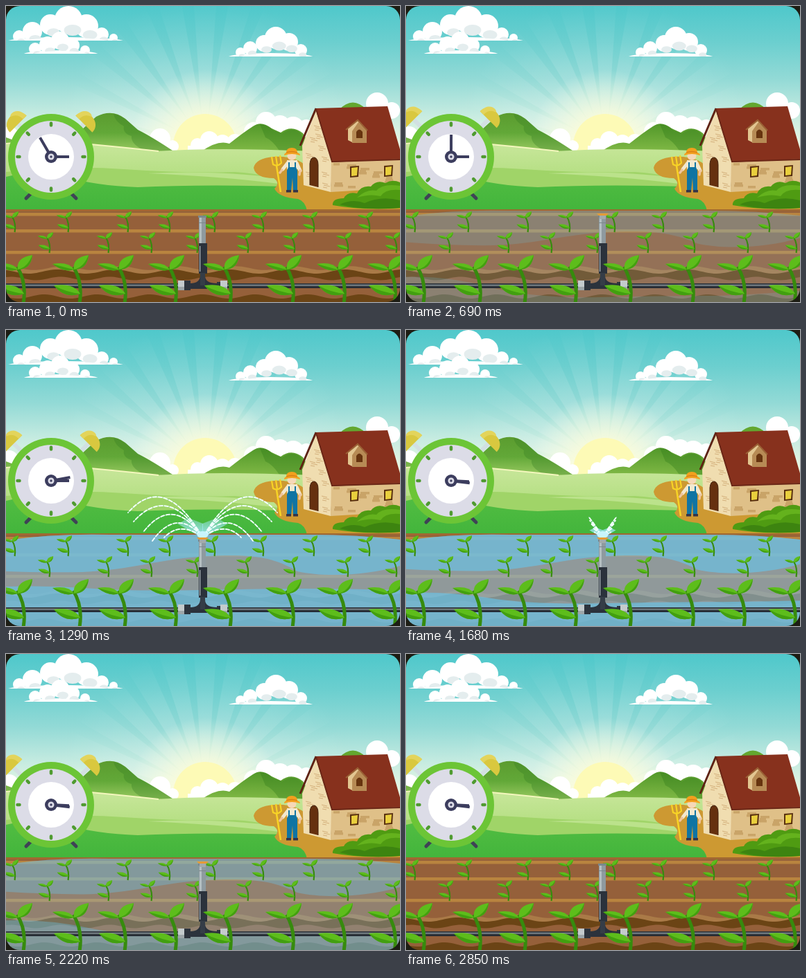
These frames come from a looping animation (568 by 428 pixels, 2880 ms). An HTML page with a canvas:

```html
<!DOCTYPE html>
<html lang="en">
<head>
<meta charset="utf-8">
<title>Timed irrigation</title>
<style>
html, body { margin: 0; width: 100%; height: 100%; overflow: hidden; background: #1d1d14; }
canvas { display: block; width: 568px; height: 428px; border-radius: 20px; }
</style>
</head>
<body>
<canvas id="stage" width="568" height="428"></canvas>
<script>
const W = 568, H = 428, LOOP = 2880, TAU = Math.PI * 2;
const stage = document.getElementById('stage').getContext('2d');
let c = stage;

function layer(draw) {
  const el = document.createElement('canvas');
  el.width = W; el.height = H;
  c = el.getContext('2d');
  draw();
  c = stage;
  return el;
}
function fill(color, d) { c.fillStyle = color; c.fill(new Path2D(d)); }
function line(color, width, d, cap = 'butt') {
  c.strokeStyle = color; c.lineWidth = width; c.lineCap = cap;
  c.stroke(new Path2D(d));
}
function box(color, x, y, w, h) { c.fillStyle = color; c.fillRect(x, y, w, h); }
function disc(color, x, y, rx, ry = rx) {
  c.fillStyle = color; c.beginPath(); c.ellipse(x, y, rx, ry, 0, 0, TAU); c.fill();
}
function fade(x0, y0, x1, y1, ...stops) {
  const g = c.createLinearGradient(x0, y0, x1, y1);
  stops.forEach((s, i) => g.addColorStop(i / (stops.length - 1), s));
  return g;
}
// Round puffs cut off along a flat base.
function cloud(base, left, right, puffs) {
  c.save();
  c.beginPath(); c.rect(0, 0, W, base); c.clip();
  disc('#fff', (left + right) / 2, base + 1, (right - left) / 2, 6);
  for (const [x, y, r] of puffs) disc('#fff', x, y, r);
  for (const [x, y, r] of puffs) disc('#e4edee', x + r * .3, y + r * .75, r * .62, r * .4);
  disc('#fff', (left + right) / 2, base + 2, (right - left) * .38, 6);
  c.restore();
}

function drawSky() {
  box(fade(0, 0, 0, 212, '#4fc8cb', '#6ccfcf', '#93dad6', '#c8ece1', '#f3fae3'), 0, 0, W, 212);
  c.save();
  c.translate(287, 200);
  for (let i = 0; i < 13; i++) {
    c.save();
    c.rotate((-84 + i * 14) * Math.PI / 180);
    fill(fade(0, -50, 0, -215, 'rgba(255,255,255,.22)', 'rgba(255,255,255,0)'), 'M-5-40L-17-215H17L5-40Z');
    c.restore();
  }
  c.restore();
  const glow = c.createRadialGradient(287, 202, 40, 287, 202, 110);
  glow.addColorStop(0, 'rgba(255,253,215,.8)');
  glow.addColorStop(1, 'rgba(255,255,235,0)');
  disc(glow, 287, 202, 110);
  disc('#fdfab6', 287, 202, 46);

  cloud(50, 2, 170, [[90, 20, 20], [64, 27, 15], [116, 29, 17], [38, 37, 14], [138, 41, 10], [19, 44, 9], [155, 46, 6]]);
  cloud(69, 25, 133, [[78, 50, 13], [60, 56, 12], [95, 57, 11], [42, 62, 9], [114, 64, 7]]);
  cloud(73, 320, 443, [[389, 46, 16], [372, 54, 12], [408, 52, 13], [352, 61, 10], [425, 64, 9], [338, 67, 7]]);
  for (const [x, y, r] of [[222, 192, 15], [205, 200, 10], [240, 203, 9], [293, 194, 13], [276, 201, 10], [312, 198, 12],
    [330, 196, 11], [375, 168, 15], [357, 182, 14], [395, 172, 14], [414, 176, 16], [433, 176, 12], [535, 141, 16], [556, 151, 12], [5, 186, 12]]) disc('#fff', x, y, r);
  box('#fff', 262, 202, 70, 10);
}

function drawHills() {
  const hill = fade(0, 155, 0, 212, '#5b9c2f', '#62a838', '#9ccb63');
  fill(hill, 'M80 206Q112 176 130 160Q153 148 172 163L190 179Q210 189 243 211Z');
  fill('rgba(48,120,30,.3)', 'M155 156Q166 158 174 165L190 179Q212 190 243 211L196 207Q180 199 181 188Q168 184 170 174Q157 167 155 156Z');
  fill(hill, 'M0 190Q18 195 32 212H0Z');
  fill(fade(0, 168, 0, 210, '#4f9628', '#7fb845'), 'M282 210Q306 193 322 199Q342 183 356 174Q368 165 383 177L396 183Q412 171 428 184L445 212Z');
  fill('rgba(48,120,25,.35)', 'M366 171Q376 171 386 180L398 184Q413 174 425 184L436 209H394Q384 194 374 190Z');
  fill('#63a72f', 'M480 150Q500 129 520 150Z');

  fill(fade(0, 196, 0, 262, '#c9e79c', '#aedc7a'), 'M0 200Q70 193 122 200Q175 205 220 210Q300 204 440 210V270H0Z');
  line('#f4f7bd', 1.8, 'M0 199Q70 193 122 200Q175 205 220 210');
  fill('#a0d468', 'M0 240Q90 230 170 236Q260 242 330 240Q380 243 430 262V280H0Z');
  fill('#bbe28b', 'M205 242Q310 236 430 253V262Q330 247 205 242Z');
  fill(fade(0, 240, 0, 295, '#52bd42', '#43b53c'), 'M0 247Q45 236 86 247Q130 260 190 262Q290 257 440 262V297H0Z');
  fill('#cd9932', 'M357 234Q360 220 386 218Q425 216 440 240L470 262L568 258V296H434Q431 282 421 279Q393 277 387 264Q396 256 386 249Q360 249 357 234Z');
}

function drawHouse() {
  fill('#f0ddb0', 'M447 151L427 202L429 259L468 269L471 225Z');
  fill('#dfc088', 'M469 223L568 220V263L468 269Z');
  for (let i = 0; i < 15; i++) {
    const x = 472 + (i * 37) % 92, y = 227 + (i * 13) % 34;
    box('#c9a468', x, y, 9 + i % 3 * 2, 3.5);
  }
  for (const [x, y] of [[444, 173], [438, 190], [450, 202], [432, 213], [455, 218], [432, 240], [455, 240], [446, 185], [456, 256]])
    line('#d3af7b', 1, `M${x} ${y}l8 2m-6 1l9 2m-10 1l6 1`);
  fill('#87311d', 'M446 148L550 145L572 221L470 226Z');
  line('#5f2313', 3, 'M447 148L424 202');
  line('#6b2717', 2, 'M447 149L470 225L568 222');
  fill('#65300f', 'M438 259V228Q439 218 445 219Q450 221 450 230V262Z');
  line('#40200c', 1, 'M438 259V228Q439 218 445 219Q450 221 450 230V262');
  for (const [x, y] of [[496, 231], [545, 230]]) {
    fill('#59300f', `M${x} ${y + 1}L${x + 13} ${y}L${x + 12} ${y + 16}L${x} ${y + 17}Z`);
    fill('#e9cf3d', `M${x + 2} ${y + 3}L${x + 11} ${y + 2}L${x + 10} ${y + 14}L${x + 2} ${y + 15}Z`);
  }
  fill('#e2c691', 'M493 177L507 166L520 178V197H499L493 194Z');
  fill('#b78b55', 'M499 181L508 168L520 179V198H499Z');
  fill('#67340f', 'M505 191V182Q509 175 514 182V191Z');
  line('#9a6135', 2.2, 'M490 179L507 165L521 180');

  fill('#4f9b12', 'M471 288Q470 278 487 278Q492 268 506 271Q512 259 526 261Q534 251 547 256Q557 250 568 255V292Q515 296 471 288Z');
  fill('#64b21d', 'M506 277Q520 264 534 267Q543 256 568 260V266Q547 264 540 275Q525 271 506 277Z');
  fill('#3d8410', 'M481 287Q500 278 517 285Q540 274 568 281V292Q515 296 481 287Z');
}

function drawFarmer() {
  line('#f8d326', 2.5, 'M390 231L396 269');
  line('#f8d326', 2.2, 'M383 218L385 229Q391 233 397 227L395 216M389 217L391 230');
  line('#f2e8cf', 5, 'M406 227L399 236', 'round');
  line('#f2e8cf', 5, 'M419 227L424 238', 'round');
  line('#efc49e', 3.5, 'M398 237L395 241M424 238L423 244', 'round');
  box('#f2e8cf', 405, 223, 15, 13);
  fill('#0f74a3', 'M407 226H409V233H416V226H418V233L420 238V268H414L413 248L411 268H405V238L407 233Z');
  box('#343448', 404, 266, 7, 3.5); box('#343448', 414, 266, 7, 3.5);
  disc('#f6d8b8', 412, 217, 6.5, 6);
  fill('#f3a01d', 'M404 212Q404 205 412 205Q420 205 420 212Q424 213 424 216Q412 212 401 216Q401 213 404 212Z');
  line('#d87d16', 1.3, 'M404 212Q412 209 420 212');
}

function wave(y, amp, len, phase) {
  let d = `M0 ${H}V${y}`;
  for (let x = 0; x <= W; x += 4) d += `L${x} ${y - amp * Math.sin((x + phase) / len * TAU)}`;
  return d + `V${H}Z`;
}
function drawSoil() {
  box('#95603a', 0, 295, W, 133);
  box('#a06832', 0, 294, W, 3);
  for (const y of [299, 323, 354]) box('#b9843f', 0, y, W, 4.5);
  fill('#aa7a47', wave(379, 2.8, 83, 22));
  fill('#6b4415', wave(384, 3, 83, 30));
  fill('#95603a', wave(394, 2.5, 71, 10));
  fill('#6b4415', wave(420, 3, 76, 40));
}

function drawPipe() {
  box('#363c43', 0, 401, W, 7);
  box('#89949a', 0, 403, W, 1.4);
  box('#202630', 0, 406.5, W, 1.5);
}
function drawRiser() {
  box('#2d343d', 257, 397, 9, 14);
  box('#2d343d', 304, 399, 8, 10);
  box('#c4cbcc', 248, 397, 9, 14); box('#9da6a9', 248, 406, 9, 5);
  box('#c4cbcc', 309, 397, 10, 14); box('#9da6a9', 309, 406, 10, 5);
  fill('#2b323c', 'M266 401Q279 401 280 390H287Q287 401 304 401V409H266Z');
  box('#2b323c', 278, 343, 12, 44);
  box('#353d47', 280, 386, 7, 18);
  box('#8e9a9f', 278, 304, 10, 39);
  box('#b4bfc2', 279, 304, 3, 39);
  box('#7b878c', 277, 303, 12, 3);
  box('#7b878c', 278, 313, 10, 1);
  box('#aab4b8', 279, 347, 1.3, 37);
}

// Origin at the foot of the stem.
function plant(x, y, s) {
  c.save();
  c.translate(x, y); c.scale(s, s);
  line('#368b0d', 5, 'M-1 0Q4-31-10-53');
  fill('#5dbd1b', 'M-9-49Q-12-66 12-70Q10-49-9-49Z');
  fill('#429f10', 'M-9-49Q5-52 12-70Q10-49-9-49Z');
  fill('#5dbd1b', 'M-9-49Q-23-44-40-57Q-17-61-9-49Z');
  fill('#429f10', 'M-9-49Q-23-44-40-57Q-22-52-9-49Z');
  fill('#5dbd1b', 'M0-14Q-22-6-38-26Q-9-30 0-14Z');
  fill('#429f10', 'M0-14Q-22-6-38-26Q-20-16 0-14Z');
  c.restore();
}
const rows = [
  [327, .43, [13, 90, 176, 236, 301, 371, 444, 524]],
  [357, .43, [63, 148, 210, 276, 349, 416, 493, 563]],
  [430, 1, [26, 107, 172, 245, 324, 414, 488, 561]]
];
function drawRow([y, s, xs]) { for (const x of xs) plant(x, y, s); }

const ground = layer(() => { drawSky(); drawHills(); drawHouse(); drawFarmer(); drawSoil(); });
const crops = layer(() => {
  drawPipe(); drawRow(rows[0]); drawRow(rows[1]); drawRiser(); drawRow(rows[2]);
});

// Piecewise linear value of a [time, value] list.
function track(t, keys) {
  for (let i = 1; i < keys.length; i++) {
    const [t0, v0] = keys[i - 1], [t1, v1] = keys[i];
    if (t < t1) return v0 + (v1 - v0) * Math.max(0, (t - t0) / (t1 - t0));
  }
  return keys[keys.length - 1][1];
}
const easeInOut = p => p < .5 ? 2 * p * p : 1 - 2 * (1 - p) ** 2;
const easeOut = p => 1 - (1 - p) ** 2;

function drawWater(alpha, q) {
  if (!alpha) return;
  c.save();
  c.globalAlpha = alpha;
  const top = 'M0 304Q70 294 150 296H420Q500 295 568 303';
  fill('rgba(141,183,203,.66)', top + 'V428H0Z');
  const blue = 'rgba(102,198,238,.6)', dip = 347 + 6 * q;
  fill(blue, `${top}V${335 + 6 * q}C520 ${dip + 2} 460 ${dip + 5} 420 ${dip - 4}C385 328 355 324 290 327C220 331 180 347 110 ${346 + 4 * q}Q50 ${345 + 6 * q} 0 ${341 + 8 * q}Z`);
  const l = 393 - 22 * q, m = 424 - 48 * q, r = 414 - 38 * q;
  fill(blue, `M0 ${l}Q60 ${l - 2} 120 ${(l + m) / 2}T280 ${m}T430 ${m - 2}T568 ${r}V428H0Z`);
  c.restore();
}

const jets = [[228, 205, 176, 264], [233, 222, 184, 277], [240, 238, 198, 292], [246, 256, 211, 305], [251, 276, 228, 300]];
function drawSpray(p, t) {
  if (p <= 0) return;
  const fan = Math.min(1, .35 + p);
  const haze = fade(0, 300, 0, 262, 'rgba(160,232,250,.95)', 'rgba(160,232,245,.2)');
  for (const side of [1, -1]) {
    c.save();
    c.translate(283.5, 0); c.scale(side, 1); c.translate(-283.5, 0);
    fill(haze, `M284 301L${284 - 37 * fan} ${300 - 20 * fan}Q${284 - 26 * fan} ${300 - 24 * fan} ${284 - 23 * fan} ${300 - 29 * fan}L284 ${300 - 20 * fan}Z`);
    for (const [cx, cy, ex, ey] of jets) {
      // Leading part of the curve, cut at p.
      const ax = 283 + (cx - 283) * p, ay = 299 + (cy - 299) * p;
      const bx = cx + (ex - cx) * p, by = cy + (ey - cy) * p;
      const d = `M283 299Q${ax} ${ay} ${ax + (bx - ax) * p} ${ay + (by - ay) * p}`;
      line('rgba(190,240,250,.45)', 1.5, d);
      c.setLineDash([5, 3]); c.lineDashOffset = -t / 12;
      line('#f4ffff', 1.8, d, 'round');
      c.setLineDash([]);
    }
    c.restore();
  }
  disc('#c8f5fd', 283.5, 296, 8, 5);
}

function drawNozzle(alpha) {
  c.globalAlpha = alpha;
  box('#a3aaab', 279, 300, 9, 8);
  fill('#e59b36', 'M275 300H292L289 303H278Z');
  c.globalAlpha = 1;
}

function hand(angle, len) {
  c.save();
  c.rotate(angle * Math.PI / 180);
  line('#3c3d5e', 4, `M0-6V${-len}`);
  c.restore();
}
function drawClock(angle, open) {
  c.save();
  c.translate(65, 218);
  for (const side of [-1, 1]) {
    c.save();
    c.scale(side, 1);
    line('#3f4256', 5, 'M30 54L36 60', 'round');
    c.rotate(Math.PI / 4);
    box('#d2e0e2', -3, -68 - 8 * open, 6, 20);
    c.translate(0, -67 - 9 * open);
    fill('#d9c83f', 'M-17 0C-17-21 17-21 17 0Z');
    fill('#e3d45b', 'M-17 0C-17-21 1-19 0-15Q-10-12-10 0Z');
    c.restore();
  }
  disc('#6cc536', 0, 0, 62);
  disc('#dcdce7', 0, 0, 52);
  disc('#fff', 0, 0, 33);
  for (let i = 0; i < 8; i++) {
    c.save();
    c.rotate(i * TAU / 8);
    line('#4f9b30', 4.5, 'M0-45.5V-48.5', 'round');
    c.restore();
  }
  hand(angle > 90 ? 93 : 90, 26);
  hand(angle, 32 - 5 * Math.max(0, angle) / 97);
  disc('#3c3d5e', 0, 0, 9);
  disc('#dcdce7', 0, 0, 4.5);
  disc('#3c3d5e', 0, 0, 1.7);
  c.restore();
}

function render(now) {
  let t = Math.floor(now % LOOP / 30) * 30;
  if (t < 90) t = 0;
  const wet = track(t, [[600, 0], [900, 1], [1900, 1], [2650, 0]]);
  const spread = track(t, [[600, 0], [960, .25], [1290, 1], [1400, 1], [1680, .6], [2220, .35], [2650, .2]]);
  const spray = track(t, [[690, 0], [960, .52], [1290, 1], [1350, 1], [1680, .18], [1750, 0]]);
  const nozzle = track(t, [[600, 0], [690, 1], [2300, 1], [2600, 0]]);
  const intro = easeOut(track(t, [[0, 0], [330, 1]]));
  const turn = easeInOut(track(t, [[660, 0], [1560, 1]]));

  c.clearRect(0, 0, W, H);
  c.drawImage(ground, 0, 0);
  drawWater(wet, spread);
  c.drawImage(crops, 0, 0);
  drawSpray(spray, t);
  drawNozzle(nozzle);
  drawClock(-30 * (1 - intro) + 97 * turn, intro);
}

const start = performance.now();
function tick() {
  render(performance.now() - start);
  requestAnimationFrame(tick);
}
tick();
</script>
</body>
</html>
```
